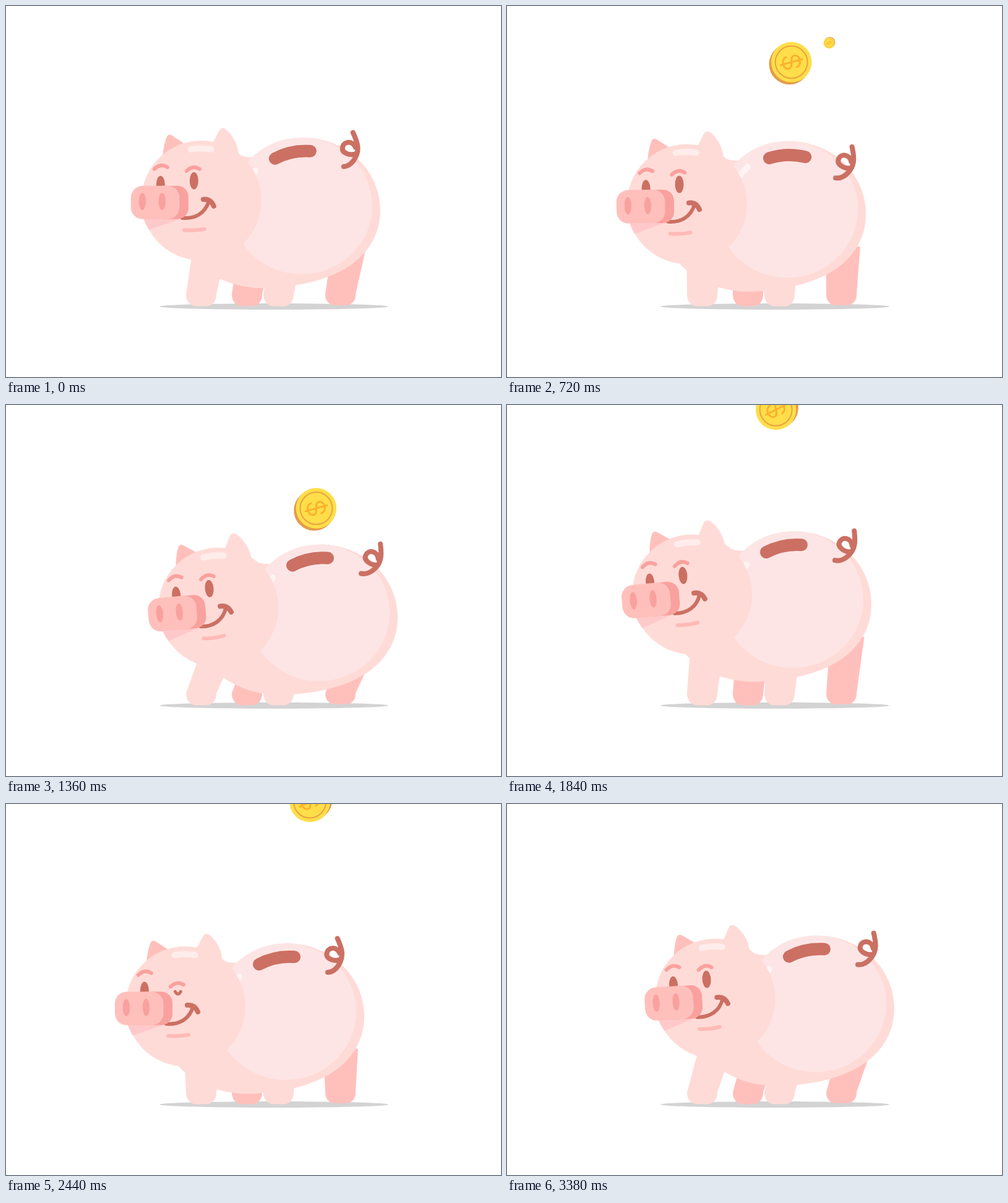
An HTML page for the animation above (3.4 s loop, 800 by 600 pixels).

```html
<!DOCTYPE html>
<html>
<head>
<meta charset="utf-8">
<title>Piggy bank</title>
<style>
  html, body { margin: 0; width: 100%; height: 100%; overflow: hidden; background: #fff; }
  svg { display: block; width: 800px; height: 600px; }
  .line { fill: none; stroke-linecap: round; stroke-linejoin: round; }
  .skin { fill: #ffdbd7; }
  .pink { fill: #ffc0bc; }
  .rose { fill: #f9a19e; }
  .brown { fill: #cb7063; }
  .brownLine { stroke: #cb7063; }
  .roseLine { stroke: #f9a19e; }
</style>
</head>
<body>
<svg viewBox="0 0 800 600">
  <clipPath id="aboveSlot"><rect id="clipBox" width="800" height="250"/></clipPath>
  <ellipse cx="433" cy="486" rx="185" ry="5" fill="#d3d3d3"/>
  <g class="pink"><path class="leg"/><path class="leg"/></g>
  <g class="skin"><path class="leg"/><path class="leg"/></g>

  <g id="pig">
    <path class="skin" d="M360 233Q380 244.500 393 244.500H408C433 223 453 213 483 213C553 215 605 268 605 331C605 394 553 452 418 456.500C368 456.500 328 438 303 410L278 323Z"/>
    <ellipse cx="478" cy="323.500" rx="114" ry="110.500" fill="#fde5e5"/>
    <g id="belly" class="line">
      <path d="M403 267Q389 285 385 311" stroke="#fff3f3" stroke-width="10"/>
      <path d="M383.500 329Q384 346 391 362" stroke="#fff" stroke-width="10"/>
      <path class="brownLine" d="M435 247Q461 233 492 235" stroke-width="20"/>
      <path id="tail" class="brownLine" stroke-width="8"
        d="M561 205C568 220 572 232 565 245Q558 259 546 260M566 239C556 243 543 238 544 230C545 219 560 217 565 229"/>
    </g>

    <g id="head">
      <path class="pink" d="M253 245Q255 224 260 212Q263 206 269 210L290 224Z"/>
      <circle class="skin" cx="316" cy="315" r="97"/>
      <path class="skin" d="M332 226L345 201Q349 195 356 200Q373 215 376 239L384 248L350 270Z"/>
      <path class="line" d="M299 232Q315 229 332 232" stroke="#ffedeb" stroke-width="10"/>
      <path d="M221 338Q224 351 231 362L289 342Z" fill="#ffc9ca"/>
      <g class="line roseLine" stroke-width="6">
        <path d="M240 264Q250 254 261 261"/>
        <path id="brow" d="M292 267Q303 257 313 264"/>
      </g>
      <ellipse class="brown" cx="250" cy="289" rx="7" ry="14"/>
      <ellipse id="eye" class="brown" cx="304" cy="283" rx="7" ry="14"/>
      <path id="wink" class="line brownLine" d="M299.500 291Q304 299 308.500 291" stroke-width="5"/>
      <g class="line brownLine">
        <path d="M285 343C305 345 322 336 328 316" stroke-width="6"/>
        <path d="M319 313Q331 312 336 324" stroke-width="8"/>
      </g>
      <path class="line" d="M288 362.500Q305 364 321 361" stroke="#ffbab7" stroke-width="6"/>
      <rect class="rose" x="236" y="291" width="59" height="54" rx="18"/>
      <rect class="pink" x="202" y="291" width="78.500" height="54" rx="19"/>
      <ellipse class="rose" cx="220.500" cy="316.500" rx="5.700" ry="14"/>
      <ellipse class="rose" cx="252.500" cy="316.500" rx="5.700" ry="14"/>
    </g>
  </g>
  <g id="coins" clip-path="url(#aboveSlot)"></g>
</svg>
<script>
const LOOP = 3400, FALL = 840;
const $ = id => document.getElementById(id);
const legs = document.querySelectorAll('.leg');
const feet = [389.5, 540.5, 315.5, 440.5];

// Smooth curve through [time, value] keys without overshoot
function curve(keys) {
  const slope = i => (keys[i + 1][1] - keys[i][1]) / (keys[i + 1][0] - keys[i][0]);
  const tangent = i => {
    if (i === 0 || i === keys.length - 1) return i ? slope(i - 1) : slope(0);
    const a = slope(i - 1), b = slope(i);
    return a * b > 0 ? 2 * a * b / (a + b) : 0;
  };
  return t => {
    t = Math.min(Math.max(t, keys[0][0]), keys[keys.length - 1][0]);
    let i = 0;
    while (i < keys.length - 2 && t > keys[i + 1][0]) i++;
    const [t0, v0] = keys[i], [t1, v1] = keys[i + 1], h = t1 - t0, u = (t - t0) / h;
    return v0 + (v1 - v0) * u * u * (3 - 2 * u)
      + h * u * (1 - u) * (tangent(i) * (1 - u) - tangent(i + 1) * u);
  };
}

const pigX = curve([[0, 478], [90, 462], [260, 453], [600, 451.5], [720, 453], [940, 488],
  [1080, 505], [1360, 506], [1490, 508], [1620, 499], [1840, 462], [2020, 453], [2360, 451.5],
  [2440, 452], [2700, 488], [2840, 505], [2920, 507], [3250, 508], [3380, 499], [3400, 496]]);
const bellyTurn = curve([[620, 0], [720, 10], [880, 0]]);
const winking = curve([[2200, 0], [2320, 1], [2540, 1], [2660, 0]]);
const coinY = curve([[0, 72], [80, 60], [255, 8], [272, -3], [400, -45], [532, 10],
  [645, 90], [720, 166], [752, 202], [FALL, 302]]);
const coinEdge = curve([[300, 3.2], [560, -3.2]]);
const coinSpin = curve([[255, 63], [645, 74.5]]);

const hops = [-80, 680, 1540, 2440, 3300];
const hopHeight = t => hops.reduce((sum, start) =>
  sum + 22.8 * Math.max(0, 1 - ((t - start - 240) / 240) ** 2), 0);

const coins = [
  { start: 75, from: 450, to: 462 },
  { start: 640, from: 523, to: 499 },
  { start: 1585, from: 433, to: 438 },
  { start: 2168, from: 487, to: 498.7 }
];
$('coins').innerHTML = coins.map(() => `<g>
  <circle r="33" fill="#e69c47"/>
  <circle r="32.700" fill="#ffde4a"/>
  <circle r="26" fill="none" stroke="#e9a33f" stroke-width="2"/>
  <path class="line" stroke="#fcb12c" stroke-width="3"
    d="M10 -6C9 -17 -10 -16 -9 -6C-8 2 8 -2 9 6C10 16 -9 17 -10 6M0 -18V18"/></g>`).join('');
coins.forEach((coin, i) => coin.node = $('coins').children[i]);

const set = (node, transform) => node.setAttribute('transform', transform);

function drawLeg(node, foot, bodyY, lean) {
  const ground = foot > 500 ? 484 : 485.5, ankle = 466, top = bodyY + 60;
  const reach = (ankle - top) / (ankle - top - 30);
  const left = foot - 24.5 + (lean - 1.5) * reach;
  const right = foot + 24.5 + (lean + 2.5) * reach;
  node.setAttribute('d', `M${left} ${top}L${foot - 24.5} ${ankle}
    C${foot - 25} 478 ${foot - 17} ${ground} ${foot - 8} ${ground}H${foot + 8}
    C${foot + 17} ${ground} ${foot + 25} 478 ${foot + 24.5} ${ankle}L${right} ${top}Z`);
}

function drawCoin({ node, start, from, to }, t) {
  const age = t - start, visible = age > 0 && age < FALL;
  node.style.display = visible ? '' : 'none';
  if (!visible) return;
  const x = from + (to - from) * age / 800;
  const scale = Math.min(1, (age / 250) ** 1.15);
  const edge = coinEdge(age);
  set(node, `translate(${x} ${coinY(age)}) scale(${scale})`);
  set(node.children[0], `translate(${edge} ${-edge})`);
  set(node.children[3], `rotate(${coinSpin(age)})`);
}

function draw(t) {
  const x = pigX(t), hop = hopHeight(t), bodyY = 336 - hop;
  const nod = 3.9 * (1 - Math.cos(t * Math.PI / 400));
  const wink = winking(t);
  const lean = 0.3 * (x - 453) + 0.15 * hop;

  set($('pig'), `translate(${x - 478} ${bodyY - 323.5})`);
  set($('head'), `rotate(${-nod} 318 323)`);
  set($('belly'), `rotate(${bellyTurn(t)} 478 323.5)`);
  set($('tail'), `rotate(${nod * 3.5} 546 260)`);
  set($('brow'), `translate(0 ${16 * wink})`);
  $('eye').setAttribute('ry', 14 * (1 - wink));
  $('eye').setAttribute('cy', 283 + 9 * wink);
  $('wink').style.display = wink > 0.8 ? '' : 'none';
  $('clipBox').setAttribute('height', bodyY - 85);
  legs.forEach((leg, i) => drawLeg(leg, feet[i], bodyY, lean));
  coins.forEach(coin => drawCoin(coin, t));
}

function tick() {
  draw(performance.now() % LOOP);
  requestAnimationFrame(tick);
}
tick();
</script>
</body>
</html>
```
